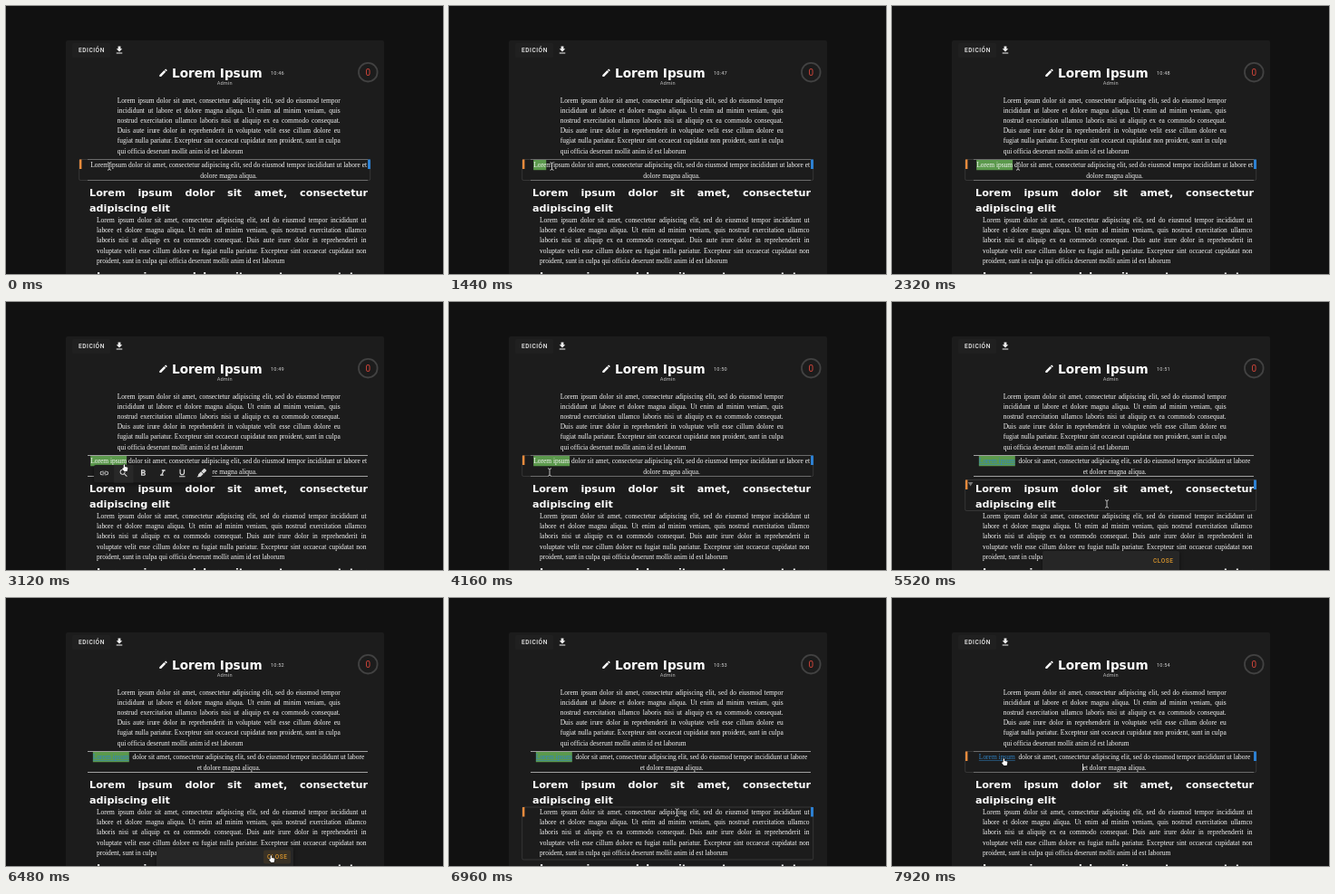
Animation of 482x296 px, one loop 8000 ms. Source, as an HTML page with a canvas:

```html
<!DOCTYPE html>
<html lang="es">
<head>
<meta charset="utf-8">
<title>Editor</title>
<style>
html, body { margin: 0; width: 100%; height: 100%; overflow: hidden; background: #111; }
canvas { display: block; width: 482px; height: 296px; }
</style>
</head>
<body>
<canvas id="stage"></canvas>
<script>
const W = 482, H = 296, LOOP = 8000, STEP = 80;
const canvas = document.getElementById('stage');
const ctx = canvas.getContext('2d');
const dpr = window.devicePixelRatio || 1;
canvas.width = W * dpr;
canvas.height = H * dpr;

const SERIF = '7.46px "Liberation Serif", serif';
const HEADING = 'bold 11.19px "DejaVu Sans", sans-serif';
const TITLE = 'bold 13.6px "DejaVu Sans", sans-serif';
const CAPTION = '5.6px Roboto, sans-serif';
const BUTTON = '500 6.52px Roboto, sans-serif';
const TEXT = '#f6f6f6', CARD = '#1c1c1c', GREEN = '#5b994c', LINK = '#2f83c6';
const LINE = 11.19;

const LOREM = ('Lorem ipsum dolor sit amet, consectetur adipiscing elit, sed do eiusmod tempor ' +
  'incididunt ut labore et dolore magna aliqua. Ut enim ad minim veniam, quis nostrud ' +
  'exercitation ullamco laboris nisi ut aliquip ex ea commodo consequat. Duis aute irure ' +
  'dolor in reprehenderit in voluptate velit esse cillum dolore eu fugiat nulla pariatur. ' +
  'Excepteur sint occaecat cupidatat non proident, sunt in culpa qui officia deserunt ' +
  'mollit anim id est laborum').split(' ');
const HEAD_LINE = LOREM.slice(0, 6);
const PHRASE = 'Lorem ipsum';

const ICONS = {
  pencil: 'M3 17.25V21h3.75L17.81 9.94l-3.75-3.75L3 17.25zM20.71 7.04a1 1 0 0 0 0-1.41l-2.34-2.34a1 1 0 0 0-1.41 0l-1.83 1.83 3.75 3.75 1.83-1.83z',
  download: 'M5 20h14v-2H5v2zM19 9h-4V3H9v6H5l7 7 7-7z',
  link: 'M3.9 12c0-1.71 1.39-3.1 3.1-3.1h4V7H7a5 5 0 0 0 0 10h4v-1.9H7c-1.71 0-3.1-1.39-3.1-3.1zM8 13h8v-2H8v2zM17 7h-4v1.9h4a3.1 3.1 0 0 1 0 6.2h-4V17h4a5 5 0 0 0 0-10z',
  search: 'M15.5 14h-.79l-.28-.27A6.47 6.47 0 0 0 16 9.5 6.5 6.5 0 1 0 9.5 16c1.61 0 3.09-.59 4.23-1.57l.27.28v.79l5 4.99L20.49 19l-4.99-5zM9.5 14a4.5 4.5 0 1 1 0-9 4.5 4.5 0 0 1 0 9z',
  bold: 'M15.6 10.79c.97-.67 1.65-1.77 1.65-2.79 0-2.26-1.75-4-4-4H7v14h7.04c2.09 0 3.71-1.7 3.71-3.79 0-1.52-.86-2.82-2.15-3.42zM10 6.5h3a1.5 1.5 0 0 1 0 3h-3v-3zM13.5 15.5H10v-3h3.5a1.5 1.5 0 0 1 0 3z',
  italic: 'M10 4v3h2.21l-3.42 8H6v3h8v-3h-2.21l3.42-8H18V4z',
  underline: 'M12 17a6 6 0 0 0 6-6V3h-2.5v8a3.5 3.5 0 0 1-7 0V3H6v8a6 6 0 0 0 6 6zM5 19v2h14v-2H5z',
  marker: 'M18.5 1.2q-.8 0-1.4.6l-5.8 5.8 5.6 5.6 5.8-5.8a2 2 0 0 0 0-2.8l-2.8-2.8q-.6-.6-1.4-.6zM10.3 8.5l-6 6a2 2 0 0 0 0 2.8L.7 21h5.6l.9-.9a2 2 0 0 0 2.8 0l6-6z',
  hand: 'M7.5 13V3.5a2 2 0 0 1 4 0V9l7 1.5a2.5 2.5 0 0 1 2 2.8l-1 6.2L18 23H9.5L3 15.5l1.5-2.3z'
};
for (const name in ICONS) ICONS[name] = new Path2D(ICONS[name]);
const BEAM = new Path2D('M-2-4.2Q-.2-4.2 0-3.2Q.2-4.2 2-4.2M0-3.2V3.2M-2 4.2Q-.2 4.2 0 3.2Q.2 4.2 2 4.2');
const TOOLS = ['link', 'search', 'bold', 'italic', 'underline', 'marker'];

// Pointer path: time, x, y
const PATH = [
  [0, 114, 177], [400, 93, 176], [960, 93, 176], [1440, 113.5, 177], [2080, 139, 177],
  [2320, 139, 177], [2880, 133, 180], [2960, 132, 182], [3120, 131, 183], [3760, 110, 189],
  [4160, 111, 188], [4640, 111, 188], [5200, 200, 186], [5440, 226, 191], [5520, 237, 223],
  [6320, 293, 288], [6640, 293, 288], [7280, 210, 186], [7440, 210, 186], [7920, 124, 181]
];

function pointer(t) {
  let i = PATH.findIndex(p => p[0] > t);
  if (i < 0) i = PATH.length;
  const a = PATH[Math.max(0, i - 1)], b = PATH[Math.min(i, PATH.length - 1)];
  const k = a === b ? 0 : (t - a[0]) / (b[0] - a[0]);
  return { x: a[1] + (b[1] - a[1]) * k, y: a[2] + (b[2] - a[2]) * k };
}

const clamp = v => Math.max(0, Math.min(1, v));
const inside = (p, x, y, w, h) => p.x >= x && p.x <= x + w && p.y >= y && p.y <= y + h;

function box(x, y, w, h, fill, r = 0) {
  ctx.fillStyle = fill;
  ctx.beginPath();
  ctx.roundRect(x, y, w, h, r);
  ctx.fill();
}

function text(str, x, y, font, color = TEXT, spacing = 0, align = 'left') {
  ctx.font = font;
  ctx.fillStyle = color;
  ctx.letterSpacing = spacing + 'px';
  ctx.textAlign = align;
  ctx.fillText(str, x, y);
  ctx.letterSpacing = '0px';
}

function width(str, font) {
  ctx.font = font;
  return ctx.measureText(str).width;
}

function justify(words, x, y, w, font, color) {
  const used = words.reduce((sum, s) => sum + width(s, font), 0);
  const gap = (w - used) / (words.length - 1);
  for (const s of words) {
    text(s, x, y, font, color);
    x += width(s, font) + gap;
  }
}

function paragraph(counts, x, y, w) {
  let at = 0;
  counts.forEach((n, i) => {
    const words = LOREM.slice(at, at += n);
    if (i < counts.length - 1) justify(words, x, y + i * LINE, w, SERIF, TEXT);
    else text(words.join(' '), x, y + i * LINE, SERIF);
  });
}

function icon(name, cx, cy, size, color = TEXT, outline) {
  const s = size / 24;
  ctx.save();
  ctx.translate(cx - size / 2, cy - size / 2);
  ctx.scale(s, s);
  if (outline) {
    ctx.strokeStyle = outline;
    ctx.lineWidth = 3;
    ctx.stroke(ICONS[name]);
  }
  ctx.fillStyle = color;
  ctx.fill(ICONS[name], 'evenodd');
  ctx.restore();
}

function drawHeader(t) {
  box(73, 41, 42, 16, '#202020', 2);
  text('EDICIÓN', 80, 51.3, BUTTON, '#f2f2f2', 0.55);
  icon('download', 125, 48.7, 11.2, '#f2f2f2');
  icon('pencil', 173.5, 73.7, 11.2, '#fff');
  text('Lorem Ipsum', 183, 79, TITLE, '#fff');
  const sec = 46 + Math.floor((t + 280) / 1000);
  text('10:' + sec, 292, 75.6, CAPTION, '#d0d0d0', 0.19);
  text('Admin', 241.2, 87.3, CAPTION, '#bdbdbd', 0.19, 'center');
  ctx.strokeStyle = '#424242';
  ctx.lineWidth = 1.8;
  ctx.beginPath();
  ctx.arc(399.3, 73.2, 10.3, 0, Math.PI * 2);
  ctx.stroke();
  text('0', 399.2, 76.8, '10px Roboto, sans-serif', '#d2453a', 0, 'center');
}

function selectionWidth(t) {
  if (t < 960 || t >= 7440) return 0;
  if (t >= 2080) return width(PHRASE, SERIF);
  const reach = pointer(t).x - 5 - 92.4;
  let w = 0;
  for (let i = 1; i <= PHRASE.length; i++) {
    const next = width(PHRASE.slice(0, i), SERIF);
    if (next <= reach) w = next;
  }
  return w;
}

function drawQuote(t, linked) {
  const rest = LOREM.slice(2, linked ? 15 : 16).join(' ');
  const tail = LOREM.slice(linked ? 15 : 16, 19).join(' ');
  const phraseW = width(PHRASE, SERIF);
  const gapW = width(' ', SERIF) * (linked ? 2 : 1);
  const x = 245.6 - (phraseW + gapW + width(rest, SERIF)) / 2;
  const sel = selectionWidth(t);
  if (sel) box(x, 170, sel, 11.2, GREEN);
  text(PHRASE, x, 178.2, SERIF, linked ? LINK : TEXT);
  if (linked) box(x, 179, phraseW, 0.6, LINK);
  text(rest, x + phraseW + gapW, 178.2, SERIF);
  text(tail, 245.6, 189.5, SERIF, TEXT, 0, 'center');
  if (t >= 7440 && (t - 7440) % 1000 < 500) box(210, 183, 0.8, 8, '#fff');
  box(90, 169, 309, 1, '#a0a0a0');
  box(90, 192, 309, 1, '#a0a0a0');
}

function drawHover(y, h, arrow) {
  ctx.strokeStyle = '#484848';
  ctx.lineWidth = 0.6;
  ctx.beginPath();
  ctx.roundRect(80.7, y, 321, h, 1.5);
  ctx.stroke();
  box(81, y, 2.4, 10.5, '#ee8b3c');
  box(399, y, 3, 10.5, '#2c80d2');
  if (arrow) {
    ctx.fillStyle = '#777';
    ctx.beginPath();
    ctx.moveTo(83.8, y + 2.6);
    ctx.lineTo(89.4, y + 2.6);
    ctx.lineTo(86.6, y + 7);
    ctx.fill();
  }
}

function raised(x, y, w, h, fill) {
  ctx.save();
  ctx.shadowColor = 'rgba(0,0,0,.5)';
  ctx.shadowBlur = 4 * dpr;
  ctx.shadowOffsetY = 1.5 * dpr;
  box(x, y, w, h, fill, 2);
  ctx.restore();
}

function drawToolbar(p) {
  raised(97, 180, 130, 19.5, '#1f1f1f');
  TOOLS.forEach((name, i) => {
    const cx = 108.3 + i * 21.5;
    if (inside(p, cx - 10.7, 180, 21.4, 19.5)) box(cx - 10.7, 180, 21.4, 19.5, '#282828');
    icon(name, cx, 189, 11.2, '#dcdcdc');
  });
}

function drawSnackbar(alpha, hover) {
  ctx.save();
  ctx.globalAlpha = alpha;
  const s = 0.8 + 0.2 * alpha;
  ctx.translate(241.5, 286);
  ctx.scale(s, s);
  ctx.translate(-241.5, -286);
  raised(166, 275, 151, 22.5, '#262626');
  if (hover) box(284, 278.5, 30, 15, '#3a3226', 2);
  text('CLOSE', 288, 288.3, BUTTON, '#d8942c', 0.55);
  ctx.restore();
}

function drawPointer(p, hand) {
  if (hand) {
    icon('hand', p.x + 0.3, p.y, 8.6, '#fff', '#111');
    return;
  }
  ctx.save();
  ctx.translate(p.x, p.y);
  for (const [color, w] of [['#111', 2.2], ['#e4e4e4', 0.9]]) {
    ctx.strokeStyle = color;
    ctx.lineWidth = w;
    ctx.stroke(BEAM);
  }
  ctx.restore();
}

function draw(t) {
  const p = pointer(t);
  const linked = t >= 4320;
  const toolbar = t >= 2400 && t < 4080;
  const snack = clamp((t - 4240) / 240) * clamp((6880 - t) / 160);
  const onToolbar = toolbar && inside(p, 97, 181, 130, 20);
  const onSnack = snack > 0 && inside(p, 166, 275, 151, 21);
  const onLink = linked && inside(p, 94, 170, 41, 13);

  ctx.setTransform(dpr, 0, 0, dpr, 0, 0);
  box(0, 0, W, H, '#111');
  box(66, 38, 351, 270, CARD, 2);
  drawHeader(t);
  paragraph([12, 13, 11, 13, 12, 8], 122.7, 106.6, 246);
  drawQuote(t, linked);
  justify(HEAD_LINE, 92, 210, 307, HEADING, '#fff');
  text('adipiscing elit', 92, 227, HEADING, '#fff');
  paragraph([14, 14, 15, 14, 12], 100, 239.1, 297.5);
  justify(HEAD_LINE, 100, 301.8, 297.5, HEADING, '#fff');

  if (!onToolbar && !onSnack) {
    if (p.y < 195) drawHover(169.5, 23);
    else if (p.y < 231) drawHover(196.5, 34, true);
    else drawHover(231, 58);
  }
  if (toolbar) drawToolbar(p);
  if (snack > 0) drawSnackbar(snack, onSnack && p.x > 284);
  drawPointer(p, onToolbar || onSnack || onLink);
}

function frame(now) {
  draw(Math.floor((now % LOOP) / STEP) * STEP);
  requestAnimationFrame(frame);
}
requestAnimationFrame(frame);
</script>
</body>
</html>
```
